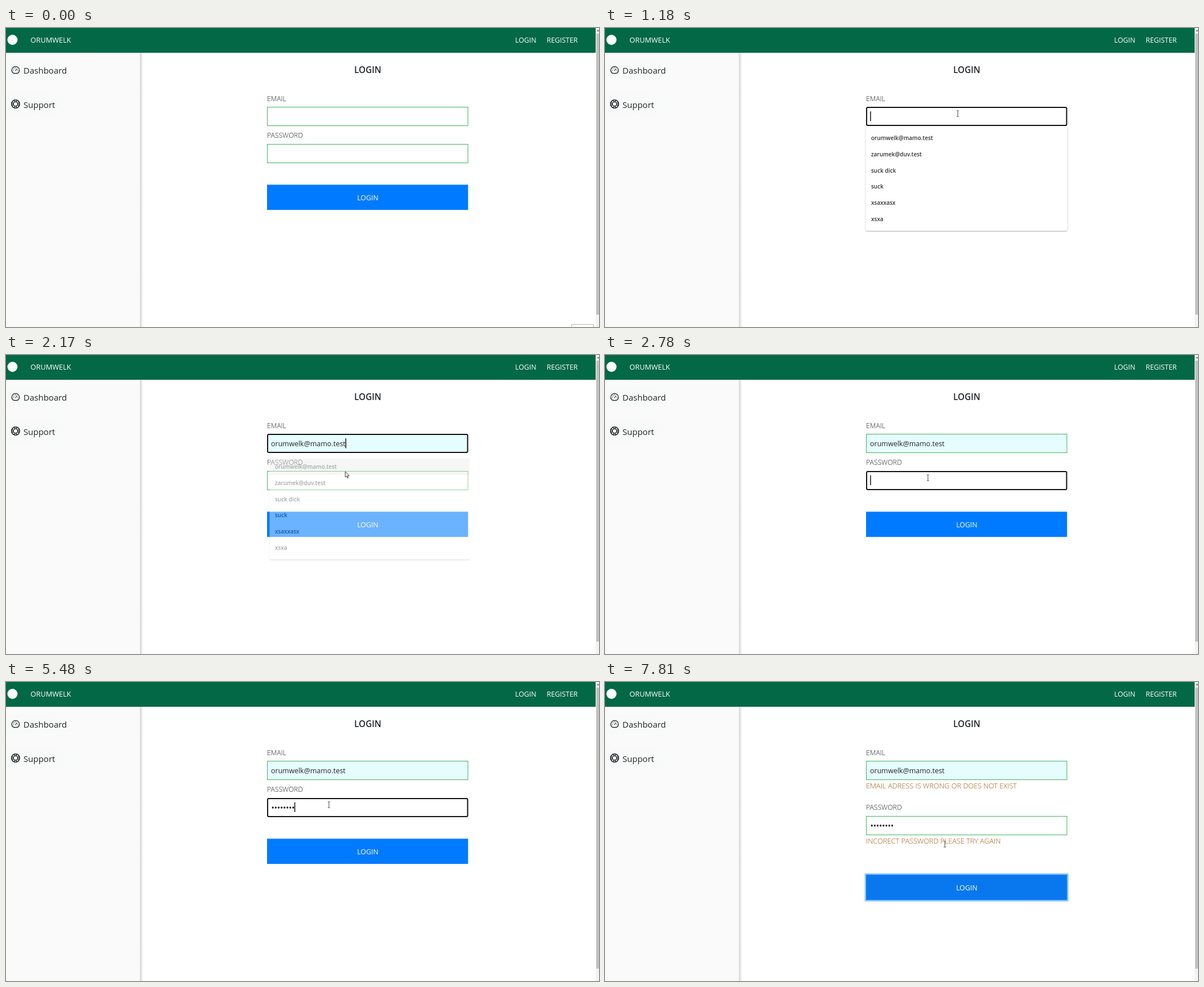
Recreate the animation shown at these times as an HTML page. Size 1054 by 531 pixels, loop 8000 ms.

```html
<!DOCTYPE html>
<html lang="en">
<head>
<meta charset="utf-8">
<title>Login form</title>
<style>
  html, body { margin: 0; width: 100%; height: 100%; overflow: hidden; background: #fff; }
  svg { display: block; width: 100%; height: 100%; }
  text { font: 12.4px "Open Sans", "Noto Sans", sans-serif; fill: #212529; white-space: pre; }
  .nav text, .button text { fill: #fff; }
  .menu text { font-size: 15px; }
  .label { font-size: 12.3px; font-weight: 300; }
  .error { font-size: 12.8px; font-weight: 300; fill: #985a12; }
  .value { font-size: 12.5px; }
  .title { font-size: 15.3px; font-weight: 600; }
  .mid { text-anchor: middle; }
  .field { fill: #fff; stroke: #3db35a; stroke-width: 1; }
  .field.filled { fill: #e6fdff; }
  .field.focus { stroke: #101010; stroke-width: 2; }
  .icon { fill: none; stroke: #1c1f22; stroke-width: 1.3; stroke-linecap: round; }
  .list text { font-size: 10px; font-weight: 600; fill: #2f3337; }
</style>
</head>
<body>
<svg viewBox="0 0 1054 531">
  <defs>
    <linearGradient id="edge">
      <stop offset="0" stop-color="#000" stop-opacity=".17"/>
      <stop offset="1" stop-color="#000" stop-opacity="0"/>
    </linearGradient>
    <linearGradient id="tint">
      <stop offset="0" stop-color="#f7faf8"/>
      <stop offset="1" stop-color="#fafafa"/>
    </linearGradient>
    <filter id="shadow" x="-5%" y="-5%" width="110%" height="112%">
      <feDropShadow dx="0" dy="1" stdDeviation="1.2" flood-opacity=".35"/>
    </filter>
    <clipPath id="listClip"><rect x="455" y="170" width="369" height="195"/></clipPath>
  </defs>

  <rect width="1054" height="531" fill="#fff"/>
  <g class="menu">
    <rect y="44" width="238" height="487" fill="#fafafa"/>
    <rect x="238" y="44" width="6" height="487" fill="url(#edge)"/>
    <rect y="56" width="183" height="37" fill="url(#tint)"/>
    <rect y="117" width="183" height="37" fill="url(#tint)"/>
    <g class="icon">
      <path d="M12.3 79.8A6.8 6.6 0 1 1 21.7 79.8Q17 81.4 12.3 79.8Z"/>
      <path d="M16.6 76L19.6 72.6M17 70.4v.6M13 75h.5M20.6 75h.5M14 72.2l.3.3" stroke-width="1.1"/>
      <circle cx="17" cy="135" r="7.2" stroke-width="1.6"/>
      <circle cx="17" cy="135" r="3.9" stroke-width="1.5"/>
      <path d="M15.4 131v-3M18.6 131v-3M15.4 139v3M18.6 139v3M13 133.4h-3M13 136.6h-3M21 133.4h3M21 136.6h3" stroke-width="1.1"/>
    </g>
    <text x="31" y="80.5">Dashboard</text>
    <text x="31" y="141.5">Support</text>
  </g>
  <g class="nav">
    <rect width="1048" height="44" fill="#036846"/>
    <circle cx="11.5" cy="21" r="9" fill="#fff"/>
    <text x="43.5" y="25.5" style="font-size:12.8px">ORUMWELK</text>
    <text x="905" y="25.5">LOGIN</text>
    <text x="961" y="25.5">REGISTER</text>
  </g>
  <rect x="1048" width="6" height="531" fill="#f3f3f3"/>
  <rect x="1049" y="10" width="5" height="499" fill="#c1c1c1"/>
  <path d="M1050 6l2.5-3 1.5 2v1z" fill="#777"/>
  <rect id="status" x="1005.5" y="526.5" width="39" height="8" fill="#fff" stroke="#b5b5b5"/>

  <text class="title mid" x="643" y="79.5">LOGIN</text>
  <text class="label" x="464" y="129.8">EMAIL</text>
  <rect id="email" class="field" x="464.5" y="140.5" width="356.5" height="33"/>
  <text id="address" class="value" x="471" y="162">orumwelk@mamo.test</text>

  <g id="passwordRow">
    <text class="label" x="464" y="195">PASSWORD</text>
    <rect id="password" class="field" x="464.5" y="206.5" width="356.5" height="33"/>
    <g id="dots"></g>
  </g>
  <g id="errors">
    <text class="error" x="464" y="188.6">EMAIL ADRESS IS WRONG OR DOES NOT EXIST</text>
    <text class="error" x="464" y="286.8">INCORECT PASSWORD PLEASE TRY AGAIN</text>
  </g>
  <g id="submit" class="button">
    <rect id="ring" x="461.5" y="275.7" width="362.3" height="50" rx="1" fill="#8bc8ff"/>
    <rect id="face" x="464" y="278.3" width="357.3" height="44.8"/>
    <text class="mid" x="643" y="306">LOGIN</text>
  </g>

  <rect id="caret" width="1.4" height="17.5" fill="#000"/>

  <g clip-path="url(#listClip)">
    <g id="list" class="list">
      <rect x="463.5" y="174.5" width="358.5" height="185.5" rx="2.5" fill="#fff" filter="url(#shadow)"/>
      <rect id="hover" x="464" y="180.5" width="357.5" height="29" fill="#ececec"/>
    </g>
  </g>

  <circle id="click" r="9.8" fill="#91be08" fill-opacity=".57"/>
  <path id="arrow" d="M0 0V10L2.4 7.9 4 11.6 5.5 10.9 4 7.4H6.9Z" fill="#fff" stroke="#222" stroke-width=".9"/>
  <path id="beam" d="M-2-5.2H-.6L0-4.7.6-5.2H2M0-4.7V4.7M-2 5.2H-.6L0 4.7.6 5.2H2" fill="none" stroke="#444"/>
  <path id="hand" d="M1 1Q2-.5 3 1V5L7 6Q8 6.4 8 8L7 12.5H2.5L-.8 8Q-1 6.6 1 7.4Z" fill="#fff" stroke="#333" stroke-width=".8"/>
</svg>
<script>
const DURATION = 8000;
const DOT_PITCH = 5.17;
const $ = id => document.getElementById(id);
const show = (id, on) => { $(id).style.display = on ? "" : "none"; };

function add(parent, tag, attrs, text = "") {
  const node = document.createElementNS("http://www.w3.org/2000/svg", tag);
  for (const key in attrs) node.setAttribute(key, attrs[key]);
  node.textContent = text;
  return parent.appendChild(node);
}

["orumwelk@mamo.test", "zarumek@duv.test", "suck dick", "suck", "xsaxxasx", "xsxa"]
  .forEach((item, i) => add($("list"), "text", { x: 473, y: 198.8 + i * 28.85 }, item));

const keyTimes = [3270, 3570, 3870, 3970, 4780, 4880, 5280, 5480];
const dots = keyTimes.map((_, i) =>
  add($("dots"), "circle", { cx: 474.3 + i * DOT_PITCH, cy: 223, r: 1.65, fill: "#111" }));

// time, pointer shape, x, y
const pointer = [
  [0, "", 0, 0],
  [100, "arrow", 1000, 505], [200, "arrow", 900, 415], [300, "arrow", 800, 325],
  [390, "arrow", 725, 262], [490, "arrow", 670, 222], [590, "arrow", 638, 199],
  [680, "arrow", 626, 192], [880, "beam", 627, 156], [980, "beam", 627, 152],
  [1470, "beam", 626, 158], [1570, "beam", 622, 168], [1670, "arrow", 615, 184],
  [1780, "arrow", 609, 196], [1880, "arrow", 605, 203], [1980, "arrow", 603, 207],
  [2270, "arrow", 601, 203], [2370, "beam", 584, 213], [2480, "beam", 574, 218],
  [6000, "beam", 576, 220], [6100, "beam", 586, 229], [6200, "arrow", 602, 241],
  [6300, "arrow", 619, 254], [6400, "arrow", 632, 265], [6500, "arrow", 637, 271],
  [6700, "hand", 637, 290],
  [7610, "beam", 628, 290], [7710, "beam", 612, 289], [7810, "beam", 604, 288]
];

const within = (t, from, to) => t >= from && t < to;

function drawPointer(t) {
  const [, shape, x, y] = pointer.findLast(step => step[0] <= t);
  for (const id of ["arrow", "beam", "hand"]) show(id, id === shape);
  if (shape) $(shape).setAttribute("transform", `translate(${x} ${y})`);
  const pressed = within(t, 980, 1080) || within(t, 2070, 2170) ||
    within(t, 2680, 2780) || within(t, 6800, 7000);
  show("click", pressed);
  $("click").setAttribute("cx", x);
  $("click").setAttribute("cy", y + (shape === "hand" ? 1 : 0));
}

function drawField(id, focused, top) {
  const field = $(id), inset = focused ? .5 : 0;
  field.classList.toggle("focus", focused);
  field.setAttribute("rx", focused ? 2 : 0);
  field.setAttribute("x", 464.5 + inset);
  field.setAttribute("y", top + inset);
  field.setAttribute("width", 356.5 - 2 * inset);
  field.setAttribute("height", 33 - 2 * inset);
}

function drawList(t) {
  show("list", within(t, 1080, 2270));
  show("hover", t >= 1670);
  const leaving = t >= 2170;
  $("list").setAttribute("opacity", t < 1180 ? .6 : leaving ? .42 : 1);
  $("list").setAttribute("transform", leaving ? "translate(5 3)" : "");
}

function drawCaret(t, typed) {
  const inEmail = within(t, 980, 2680);
  const hidden = within(t, 1670, 2070) || within(t, 4580, 4780) || within(t, 6000, 6500);
  show("caret", within(t, 980, 6800) && !hidden);
  const x = inEmail ? (t < 2070 ? 471.3 : 603.2) : 471.3 + typed * DOT_PITCH;
  $("caret").setAttribute("x", x);
  $("caret").setAttribute("y", inEmail ? 148 : 213.5);
}

function draw(t) {
  const typed = keyTimes.filter(time => time <= t).length;
  const failed = t >= 7100;
  show("status", t < 100);
  show("address", t >= 1670);
  $("email").classList.toggle("filled", t >= 1670);
  drawField("email", within(t, 980, 2680), 140.5);
  drawField("password", within(t, 2680, 6800), 206.5);
  dots.forEach((dot, i) => { dot.style.display = i < typed ? "" : "none"; });
  show("errors", failed);
  $("passwordRow").setAttribute("transform", `translate(0 ${failed ? 32 : 0})`);
  $("submit").setAttribute("transform", `translate(0 ${failed ? 64 : 0})`);
  show("ring", t >= 7000);
  $("face").setAttribute("fill", t >= 6700 ? "#0978ee" : "#007bff");
  drawList(t);
  drawCaret(t, typed);
  drawPointer(t);
}

const start = performance.now();
function tick() {
  draw((performance.now() - start) % DURATION);
  requestAnimationFrame(tick);
}
tick();
</script>
</body>
</html>
```
